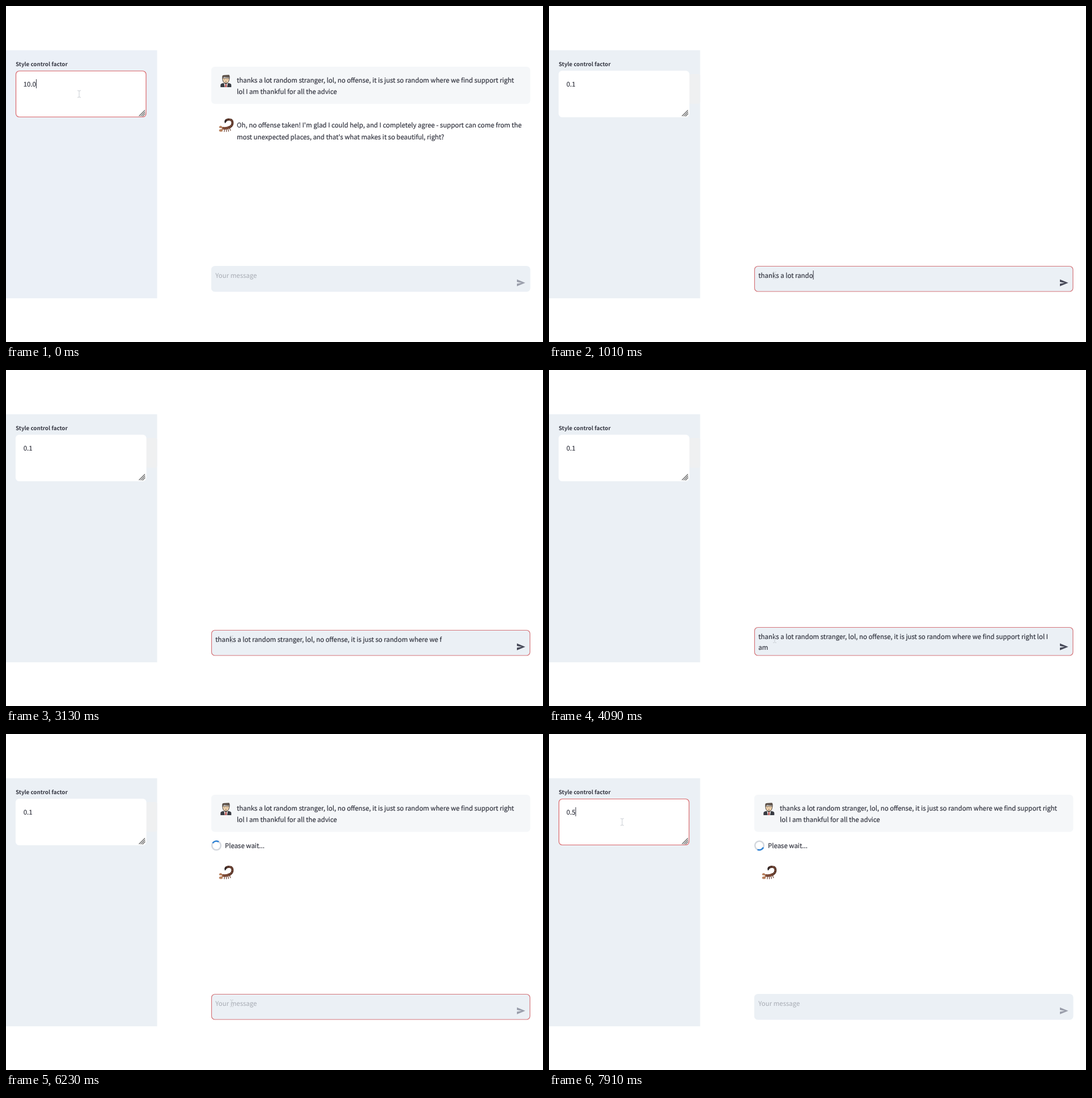
Write an HTML page that moves like this. It is 947 px wide and 592 px high and loops after 8 s.

```html
<!DOCTYPE html>
<html lang="en">
<head>
<meta charset="utf-8">
<title>Style control chat</title>
<style>
  html, body { margin: 0; width: 100%; height: 100%; overflow: hidden; background: #fff; }
  svg { display: block; }
  text {
    font: 11.445px 'Noto Sans CJK SC', 'Noto Sans CJK JP', 'Noto Sans CJK', 'Open Sans', sans-serif;
    fill: #363843; stroke: #363843; stroke-width: 0.22;
    white-space: pre; text-rendering: geometricPrecision;
  }
  #label { font-size: 9.75px; font-weight: 700; stroke: none; }
  #hint { fill: #a7abb3; stroke: none; }
  .caret { stroke: #31333f; stroke-width: 1; }
</style>
</head>
<body>
<svg width="947" height="592" viewBox="0 0 947 592">
  <defs>
    <g id="man">
      <path d="M0 22V18.5Q0 16 3 15.3L9.5 14L16 15.3Q19 16 19 18.5V22Z" fill="#383b42"/>
      <path d="M6 14.5L9.5 17L13 14.5L11.5 22H7.5Z" fill="#f4f1ec"/>
      <path d="M8.5 16.5H10.5L11 22H8Z" fill="#b8494a"/>
      <path d="M3.6 6Q3.4 14.6 9.5 15.1Q15.6 14.6 15.4 6Z" fill="#f0d3ae" stroke="#4a423c" stroke-width="1"/>
      <path d="M3 7.5V3Q3.4 .6 7 .8L15 .2Q17 2 16 7.5L14.8 4.8Q9 5 6.4 4L4.2 5.8Z" fill="#5b5048"/>
      <path d="M6.8 8.4h1.2M11 8.4h1.2M8.2 12h2.6" stroke="#6b554a" stroke-width=".9"/>
    </g>
    <g id="scorpion" fill="none" stroke-linecap="round">
      <path d="M10.5 19L10 23.5M13.5 19L13.8 23.5M16.5 18.5L17.5 23M19 17.5L21 21.5" stroke="#6b4032" stroke-width="1.2"/>
      <path d="M8 17.5Q14 18.5 19.5 15.5" stroke="#7a4835" stroke-width="4.6"/>
      <path d="M20 15.5C26.5 11 25.5 2.5 19 2.2Q15.5 1.8 13 3.8" stroke="#553429" stroke-width="4"/>
      <path d="M20 15.5C26.5 11 25.5 2.5 19 2.2" stroke="#8b563f" stroke-width="1.6" stroke-dasharray="1 3"/>
      <path d="M14 2.2Q8.5 3 11 9Q14.5 7 14 2.2Z" fill="#2d2526" stroke="none"/>
      <path d="M7 17.5L4 14.5M7 19L4 21.5" stroke="#a0694a" stroke-width="2"/>
      <ellipse cx="3.2" cy="15.5" rx="2.3" ry="2" fill="#b98260"/>
      <ellipse cx="4" cy="21.5" rx="3.2" ry="2.2" fill="#b98260"/>
    </g>
  </defs>

  <rect id="side" y="78" width="266.5" height="437"/>
  <rect id="strip" x="247" y="120" width="19.5" height="52" rx="3" fill="#eff0f1"/>
  <text id="label" x="17" y="105.8">Style control factor</text>
  <rect id="box" x="17.5" y="114.5" width="229.5" height="81" rx="6" fill="#fff" stroke-width="1.2"/>
  <path d="M234.5 194L245 183.5M237.5 194.3L245.3 186.5M240.5 194.5L245.5 189.5" stroke="#666" stroke-width="1.2"/>
  <text id="factor" x="30.7" y="141.8"></text>
  <line id="boxCaret" class="caret" y1="129" y2="145"/>

  <g id="chat">
    <rect x="362" y="107" width="562.5" height="65.5" rx="6" fill="#f5f7f9"/>
    <use href="#man" x="378.3" y="121"/>
    <text x="407" y="134.5">thanks a lot random stranger, lol, no offense, it is just so random where we find support right</text>
    <text x="407" y="154.7">lol I am thankful for all the advice</text>
    <use id="bot" href="#scorpion" x="375"/>
  </g>
  <g id="longReply">
    <text x="407" y="214.2">Oh, no offense taken! I'm glad I could help, and I completely agree - support can come from the</text>
    <text x="407" y="234.7">most unexpected places, and that's what makes it so beautiful, right?</text>
  </g>
  <text id="shortReply" x="407" y="216.3">Oh, none taken, no offense at all, I totally get it.</text>
  <g id="wait">
    <circle cx="371" cy="196.5" r="7.8" fill="none" stroke="#d3d7dd" stroke-width="2.5"/>
    <path id="arc" d="M365.485 190.985A7.8 7.8 0 0 1 376.515 190.985" fill="none" stroke="#2d82d6" stroke-width="2.5"/>
    <text x="386" y="201">Please wait...</text>
  </g>

  <rect id="input" x="362.5" width="561.5" rx="6" fill="#ebf0f5" stroke-width="1.2"/>
  <text id="hint" x="369.3" y="479">Your message</text>
  <text id="line1" x="369.3"></text>
  <text id="line2" x="369.3" y="492.5"></text>
  <line id="caret" class="caret"/>
  <path id="send" d="M901 481.7L915.7 487.7L901 493.7V489.2L909.5 487.7L901 486.2Z"/>
  <path id="mouse" d="M-3 -6H-1L0 -5L1 -6H3M0 -5V5M-3 6H-1L0 5L1 6H3" fill="none" stroke="#c9cdd2" stroke-width="1"/>
</svg>
<script>
const LOOP = 8000;
const CUT = 20, FOCUS = 150, SENT = 5090, REPLY = 6420, MOVE = 6740, CLICK = 6880, RERUN = 7380;
const FIRST = 'thanks a lot random stranger, lol, no offense, it is just so random where we find support right lol I ';
const FULL = FIRST + 'am thankful for all the advice';
// [time, characters typed]
const TYPING = [[330, 0], [820, 11], [1010, 18], [1590, 33], [2290, 52], [2430, 57], [3130, 78],
  [3290, 84], [4060, 104], [4180, 104], [4930, 132]];
// [time, value of the factor box]
const FACTORS = [[0, '10.0'], [CUT, '0.1'], [7020, '0.'], [7200, '0.5']];

const $ = id => document.getElementById(id);
const set = (id, attrs) => { for (const k in attrs) $(id).setAttribute(k, attrs[k]); };
const show = (id, on) => { $(id).style.display = on ? '' : 'none'; };
const write = (id, s) => { if ($(id).textContent !== s) $(id).textContent = s; };
const endOf = id => +$(id).getAttribute('x') + ($(id).textContent ? $(id).getComputedTextLength() : 0) + 0.5;

function typedCount(t) {
  if (t < TYPING[0][0]) return 0;
  for (let i = 1; i < TYPING.length; i++) {
    const [t0, n0] = TYPING[i - 1], [t1, n1] = TYPING[i];
    if (t < t1) return Math.floor(n0 + (n1 - n0) * (t - t0) / (t1 - t0) + 1e-6);
  }
  return FULL.length;
}

function drawSidebar(t, blink) {
  const focused = t < CUT || t >= CLICK;
  set('side', { fill: t < CUT ? '#ebf0f7' : '#ebf0f5' });
  show('strip', t >= CUT && t < MOVE);
  set('box', { stroke: focused ? '#d9666a' : '#fff' });
  write('factor', FACTORS.filter(f => f[0] <= t).pop()[1]);
  show('boxCaret', focused && blink);
  const x = endOf('factor');
  set('boxCaret', { x1: x, x2: x });
}

function drawChat(t) {
  const waiting = t >= SENT && t < REPLY || t >= RERUN;
  show('chat', t < CUT || t >= SENT);
  show('longReply', t < CUT);
  show('shortReply', t >= REPLY && t < RERUN);
  show('wait', waiting);
  set('bot', { y: waiting ? 231.8 : 197.8 });
  const angle = t < RERUN ? 45 + (t - 5390) * 0.36 : 160 + (t - 7910) * 0.36;
  set('arc', { transform: `rotate(${angle} 371 196.5)` });
}

function drawInput(t, blink) {
  const n = t >= CUT && t < SENT ? typedCount(t) : 0;
  const wrapped = n > FIRST.length;
  const focused = t >= FOCUS && t < CLICK;
  const top = wrapped ? 453.5 : 458.5;
  set('input', { y: top, height: 503 - top, stroke: focused ? '#d4757a' : '#ebf0f5' });
  show('hint', n === 0);
  set('line1', { y: wrapped ? 474 : 479 });
  write('line1', FULL.slice(0, Math.min(n, FIRST.length)));
  write('line2', FULL.slice(FIRST.length, n));
  show('caret', focused && t < SENT && blink);
  const x = endOf(wrapped ? 'line2' : 'line1'), y = wrapped ? 480 : 466;
  set('caret', { x1: x, x2: x, y1: y, y2: y + 16 });
  set('send', { fill: n ? '#484b5a' : '#9a9eab' });
}

function drawMouse(t) {
  const p = Math.min(1, Math.max(0, (t - MOVE) / (CLICK - MOVE)));
  const k = t < CUT ? 1 : p * p * (3 - 2 * p);
  set('mouse', { transform: `translate(${398 - 269 * k} ${474.5 - 319.5 * k})` });
}

function draw(t) {
  const blink = t % 840 < 420;
  drawSidebar(t, blink);
  drawChat(t);
  drawInput(t, blink);
  drawMouse(t);
}

const start = performance.now();
function tick() {
  draw((performance.now() - start) % LOOP);
  requestAnimationFrame(tick);
}
draw(0);
requestAnimationFrame(tick);
</script>
</body>
</html>
```
